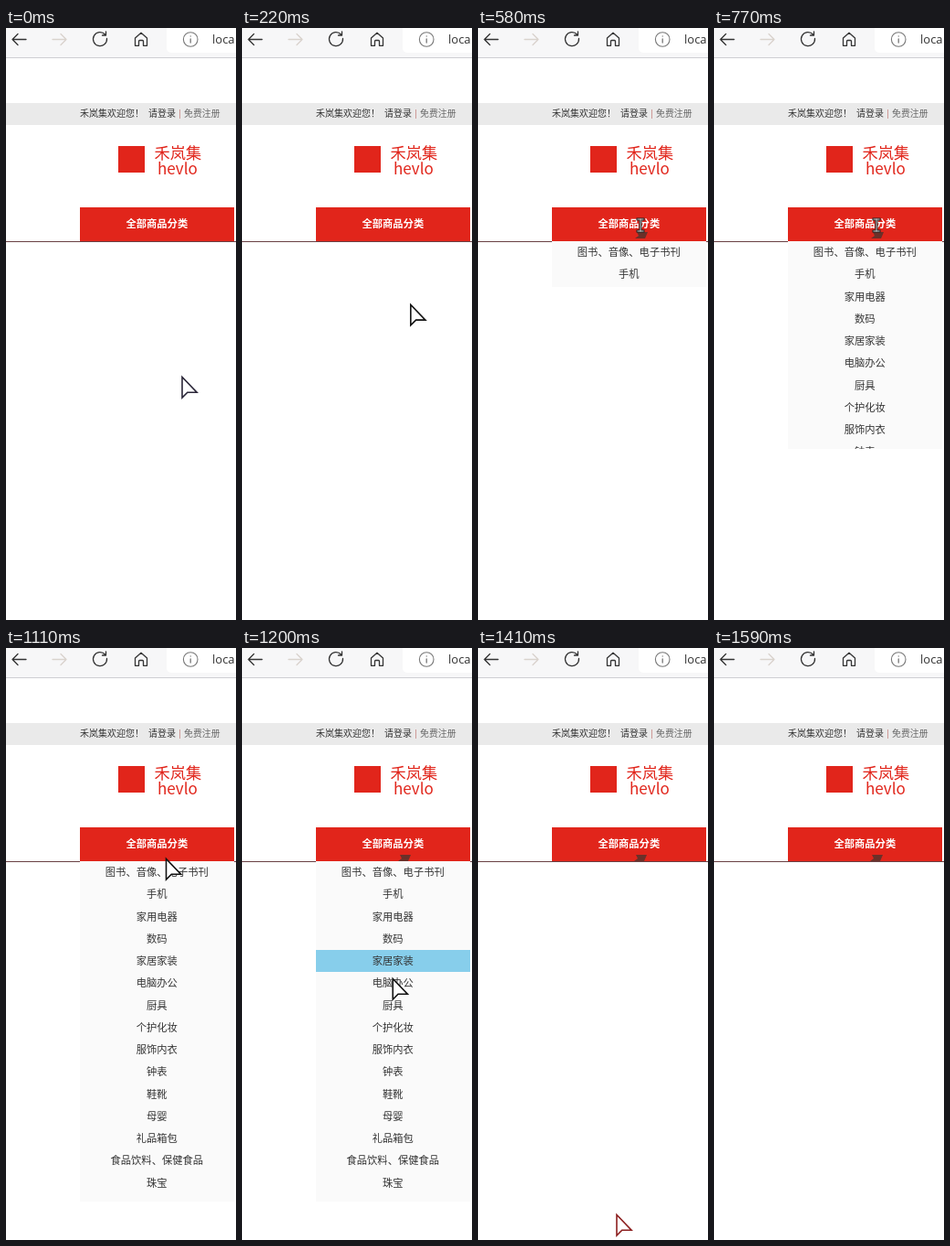
An HTML page with a canvas for the animation above (1950 ms loop, 252 by 647 pixels).

```html
<!DOCTYPE html>
<html lang="zh">
<head>
<meta charset="utf-8">
<title>商品分类</title>
<style>
html, body { margin: 0; width: 100%; height: 100%; overflow: hidden; background: #fff; }
canvas { display: block; width: 252px; height: 647px; }
</style>
</head>
<body>
<canvas id="stage" width="252" height="647"></canvas>
<script>
const ctx = document.getElementById('stage').getContext('2d');
const CJK = '"Noto Sans CJK SC", "Noto Sans CJK", sans-serif';
const RED = '#e1251b';
const LOOP = 1950, STEP = 30.6, SHIFT = 1.5;
const ROW = 24.25, MENU_TOP = 233, MENU_HEIGHT = 372;
const OPEN_AT = 526, OPEN_TIME = 400, LEAVE_AT = 1110, CLOSE_AT = 1400, END = 1590;
const ITEMS = ['图书、音像、电子书刊', '手机', '家用电器', '数码', '家居家装', '电脑办公',
  '厨具', '个护化妆', '服饰内衣', '钟表', '鞋靴', '母婴', '礼品箱包', '食品饮料、保健食品', '珠宝'];

// Pointer on its way out: time, x, y
const EXIT = [[1110, 175, 230], [1290, 154.5, 492], [1380, 152.5, 602],
  [1410, 151.5, 619], [1500, 151, 641], [1590, 150, 660]];

const clamp = (v, lo, hi) => Math.min(hi, Math.max(lo, v));

function rect(x, y, w, h, color) {
  ctx.fillStyle = color;
  ctx.fillRect(x, y, w, h);
}

function text(str, x, midY, size, color, weight = 400, align = 'left', family = CJK) {
  ctx.font = `${weight} ${size}px ${family}`;
  ctx.textAlign = align;
  ctx.fillStyle = color;
  ctx.fillText(str, x, midY + size * 0.38);
}

function stroke(path, color, width = 1.3) {
  ctx.strokeStyle = color;
  ctx.lineWidth = width;
  ctx.stroke(new Path2D(path));
}

function toolbar() {
  rect(0, 0, 252, 32, '#f7f7f8');
  rect(0, 32, 252, 1, '#cfcfd3');
  ctx.fillStyle = '#fff';
  ctx.beginPath();
  ctx.roundRect(176, -10, 100, 37, 5);
  ctx.fill();
  ctx.lineCap = ctx.lineJoin = 'round';
  stroke('M22 12.5H7M13 6.5L7 12.5L13 18.5', '#333');
  stroke('M51 12.5H66M60 6.5L66 12.5L60 18.5', '#d9d3cd');
  stroke('M108.5 7A7.5 7.5 0 1 0 110.5 11.5M109.5 4V8H105.5', '#333');
  stroke('M141.5 11L148 5.2L154.5 11V19.3H150.5V14.5Q150.5 13.5 149.5 13.5H146.5Q145.5 13.5 145.5 14.5V19.3H141.5Z', '#333');
  stroke('M210 12.5A7.8 7.8 0 1 1 194.4 12.5A7.8 7.8 0 1 1 210 12.5', '#777', 1.1);
  stroke('M202.2 11.8V16M202.2 9V9.1', '#777', 1.3);
  text('loca', 226, 12.5, 13, '#333', 400, 'left', '"Open Sans", sans-serif');
}

function header() {
  rect(0, 82, 252, 24, '#eaeaea');
  text('禾岚集欢迎您！', 81, 93.5, 10, '#333');
  text('请登录', 156, 93.5, 10, '#333');
  rect(190, 89, 1, 10, '#cf9a98');
  text('免费注册', 195, 93.5, 9.9, '#666');
  rect(123, 129, 29, 29, RED);
  text('禾岚集', 162.5, 136, 17.2, RED, 500);
  text('hevlo', 166, 154, 17, RED);
  rect(0, 233, 252, 1, '#694144');
  rect(81, 196, 169, 37, RED);
  text('全部商品分类', 165.3, 214, 11.3, '#fff', 700, 'center');
}

function menu(t) {
  if (t >= CLOSE_AT) return;
  const height = clamp((t - OPEN_AT) / OPEN_TIME, 0, 1) * MENU_HEIGHT;
  if (!height) return;
  // The highlight trails the pointer slightly
  const hover = t > LEAVE_AT ? Math.floor((exitPoint(t - 20).y - MENU_TOP) / ROW) : -1;
  ctx.save();
  ctx.beginPath();
  ctx.rect(81, MENU_TOP, 169, Math.round(height));
  ctx.clip();
  rect(81, MENU_TOP, 169, MENU_HEIGHT, '#fafafa');
  ITEMS.forEach((item, i) => {
    const y = MENU_TOP + i * ROW;
    if (i === hover) rect(81, Math.round(y), 169, 24, '#87ceeb');
    text(item, 165.3, Math.round(y + 12), 11.3, '#333', 400, 'center');
  });
  ctx.restore();
}

function exitPoint(t) {
  let i = 1;
  while (i < EXIT.length - 1 && EXIT[i][0] < t) i++;
  const [t0, x0, y0] = EXIT[i - 1], [t1, x1, y1] = EXIT[i];
  const p = clamp((t - t0) / (t1 - t0), 0, 1);
  return { x: x0 + (x1 - x0) * p, y: y0 + (y1 - y0) * p };
}

function enterPoint(t) {
  const p = 1 - Math.pow(1 - clamp((t - 40) / 510, 0, 1), 1.5);
  return { x: 192.5 - 17 * p, y: 381 - 165 * p };
}

function arrow({ x, y }, color) {
  ctx.save();
  ctx.translate(x, y);
  ctx.lineJoin = 'miter';
  ctx.fillStyle = '#fff';
  const shape = 'M0.5 0.5V23L6.3 17.2H16.6Z';
  ctx.fill(new Path2D(shape));
  stroke(shape, color, 1.6);
  ctx.restore();
}

function beam(x, y) {
  const shape = `M${x - 3} ${y - 7}H${x + 3}M${x} ${y - 7}V${y + 6}M${x - 3} ${y + 6}H${x + 3}`;
  ctx.lineCap = 'square';
  stroke(shape, '#222', 3);
  stroke(shape, '#ddd', 0.9);
}

// Dark smudge the pointer leaves on the button
function smudge(x, y) {
  ctx.fillStyle = '#6b3029';
  ctx.fill(new Path2D(`M${x + 2} ${y}L${x + 14} ${y}L${x + 11} ${y + 7}H${x}L${x + 4} ${y + 4}Z`));
}

function pointer(t) {
  if (t >= LEAVE_AT) {
    if (t > LEAVE_AT) smudge(171, 226);
    if (t < END) arrow(exitPoint(t), t < CLOSE_AT ? '#111' : '#8c1f1f');
    return;
  }
  const at = enterPoint(t);
  if (at.y > 222) return arrow(at, t < 40 ? '#2a2638' : '#111');
  smudge(172, 223);
  beam(178, at.y);
}

// Hold each pose for about 30 ms, on a 10 ms clock
function poseTime(ms) {
  const step = Math.floor((Math.floor(ms / 10) * 10 + SHIFT) / STEP);
  return Math.min(END, Math.ceil((step * STEP - SHIFT) / 10) * 10);
}

function frame(now) {
  const t = poseTime(now % LOOP);
  rect(0, 0, 252, 647, '#fff');
  toolbar();
  header();
  menu(t);
  pointer(t);
}

const start = performance.now();
function tick() {
  frame(performance.now() - start);
  requestAnimationFrame(tick);
}
tick();
</script>
</body>
</html>
```
